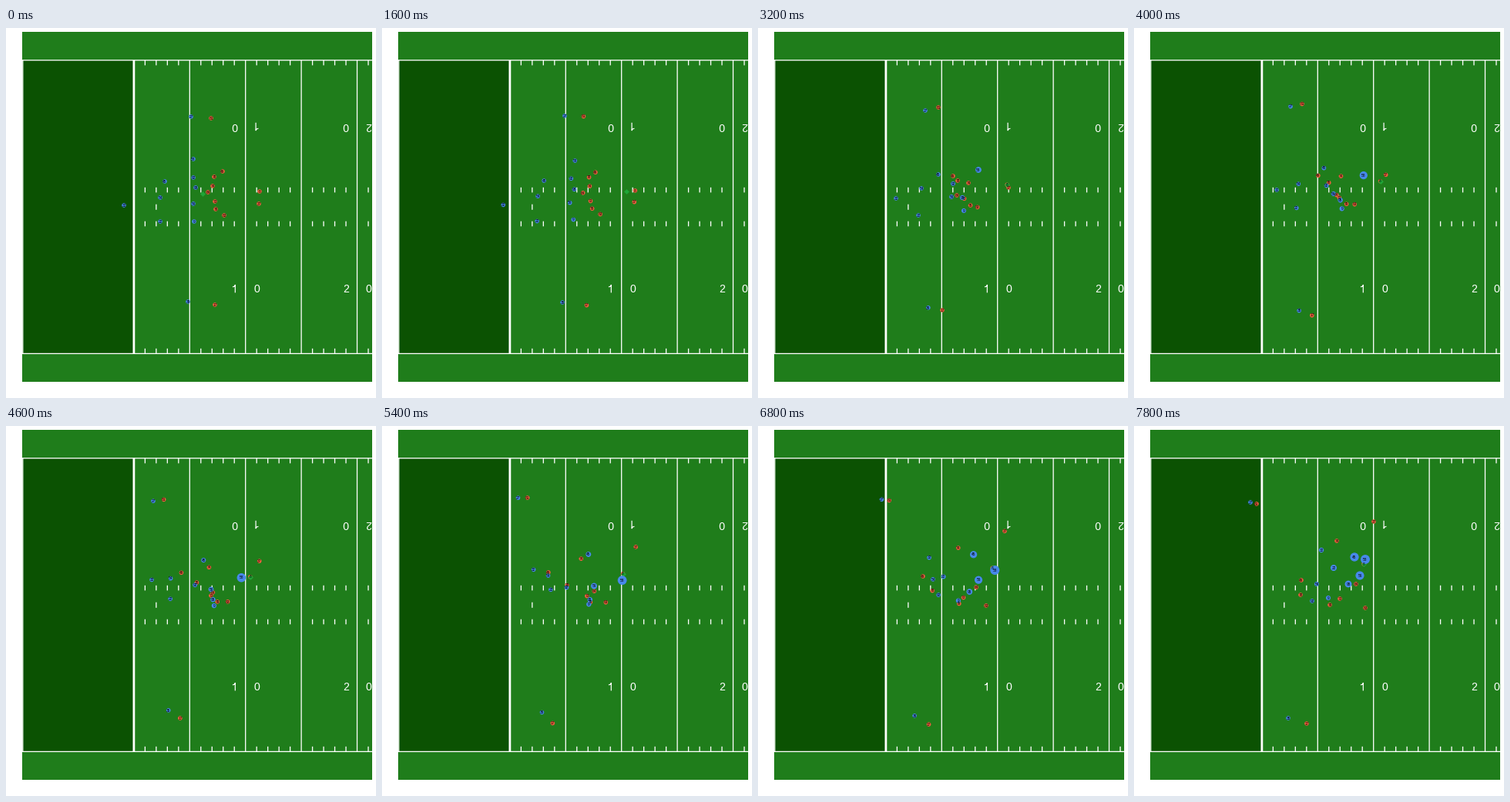
These frames come from a looping animation (480 px wide and 480 px high, 8000 ms). A matplotlib script:

```python
import numpy as np
import matplotlib.pyplot as plt
from matplotlib.animation import FuncAnimation
from matplotlib.patches import Rectangle

SIZE, DPI = 480, 100
FRAMES, STEP = 40, 200
PX = 72 / DPI

GRASS, ENDZONE = "#1f7d1b", "#0b5202"
BLUE, RED, BALL = "#4788ea", "#f0603f", "#1fa637"
GOAL, YARD = 165.9, 14.48
TOP, BOTTOM = 41.8, 422.4
LEFT, RIGHT = 21, 475

TIMES = np.arange(FRAMES) * STEP / 1000
MOVE_START, MOVE_END = 0.9, 7.8
DOT, GROWTH, REACH = 5.6, 6.5, 40


def run(*points):
    """Path from rest through evenly timed points, as a cubic Hermite curve."""
    p = np.array(points, float)
    last = len(p) - 1
    u = np.clip((TIMES - MOVE_START) / (MOVE_END - MOVE_START), 0, 1) * last
    i = np.minimum(u.astype(int), last - 1)
    s = (u - i)[:, None]
    m = np.gradient(p, axis=0)
    m[0] = 0
    return ((2 * s**3 - 3 * s**2 + 1) * p[i] + (s**3 - 2 * s**2 + s) * m[i]
            + (3 * s**2 - 2 * s**3) * p[i + 1] + (s**3 - s**2) * m[i + 1])


passer = run((329, 212), (318, 197), (298, 179))

offense = {
    "81": run((266, 117), (234, 103), (187, 93), (159, 101)),
    "49": run((281, 186), (253, 192), (215, 190), (217, 200)),
    "78": run((270, 193), (259, 198), (239, 207), (216, 219)),
    "74": run((268, 205), (273, 201), (258, 171), (263, 149)),
    "64": run((262, 213), (258, 217), (276, 214), (288, 205)),
    "73": run((271, 225), (266, 220), (267, 224)),
    "79": run((272, 235), (275, 228), (254, 232)),
    "83": run((283, 243), (287, 228), (300, 236)),
    "37": run((328, 228), (325, 207), (329, 155), (311, 124)),
    "17": run((271, 359), (239, 366), (221, 386), (224, 386)),
    "8": passer,
}

defense = {
    "27": run((240, 115), (217, 107), (175, 93), (151, 99)),
    "58": run((243, 170), (286, 184), (312, 200), (300, 173)),
    "92": run((243, 194), (253, 202), (239, 210), (231, 227)),
    "45": run((206, 199), (234, 190), (269, 166), (286, 170)),
    "95": run((246, 207), (265, 220), (270, 225), (278, 205)),
    "54": run((200, 220), (212, 208), (216, 194), (237, 205)),
    "56": run((243, 228), (251, 219), (276, 207), (293, 194)),
    "22": run((200, 251), (208, 243), (220, 211), (259, 184)),
    "9": run((244, 251), (267, 237), (268, 231), (252, 223)),
    "32": run((153, 230), (179, 221), (198, 185), (243, 161)),
    "35": run((236, 355), (212, 368), (200, 379)),
}

# The ball flies from the snap to the passer, then stays with him.
flight = np.clip((TIMES - 0.2) / 1.65, 0, 1)[:, None]
ball_path = (1 - flight) * (255, 215) + flight * passer


def pressure_size(path):
    """Defenders swell as they close in on the passer."""
    dist = np.hypot(*(path - passer).T)
    return DOT + GROWTH * np.exp(-(dist / REACH) ** 2)


class Team:
    def __init__(self, ax, players, color, z, size=None):
        self.paths = np.array(list(players.values()))
        sizes = [size(p) if size else np.full(FRAMES, DOT) for p in self.paths]
        self.areas = (np.array(sizes) * PX) ** 2
        self.dots = ax.scatter(*self.paths[:, 0].T, c=color, linewidths=0, zorder=z)
        self.texts = [ax.text(0, 0, s, size=4.8 * PX, ha="center",
                              va="baseline", zorder=9) for s in players]

    def update(self, k):
        pos = self.paths[:, k]
        self.dots.set_offsets(pos)
        self.dots.set_sizes(self.areas[:, k])
        for text, (x, y) in zip(self.texts, pos):
            text.set_position((x, y + 1.7))


def line(ax, xs, ys, width=1.3):
    ax.plot(xs, ys, color="white", lw=width * PX, solid_capstyle="butt",
            snap=False, zorder=2)


def digit(ax, x, y, char, flip=1):
    """A yard number on its baseline; flip=-1 turns it upside down."""
    if char == "1":
        stem = np.array([(-2.2, -7.5), (0.2, -8.3), (1.1, -10), (1.1, 0)])
        xs, ys = (stem * flip + (x, y)).T
        line(ax, xs, ys, 1.2)
        return
    ax.text(x, y, char, color="white", size=14 * PX, ha="center", va="baseline",
            rotation=0 if flip > 0 else 180, rotation_mode="anchor", zorder=3)


def draw_field(ax):
    ax.add_patch(Rectangle((LEFT, 5.2), RIGHT - LEFT, 454, fc=GRASS, lw=0, zorder=0))
    ax.add_patch(Rectangle((22, TOP), GOAL - 22, BOTTOM - TOP, fc=ENDZONE, lw=0, zorder=1))
    for y in (TOP, BOTTOM):
        line(ax, [LEFT, RIGHT], [y, y])
    line(ax, [21.8, 21.8], [TOP, BOTTOM])
    line(ax, [GOAL, GOAL], [TOP, BOTTOM], 2.8)
    for yard in range(1, 22):
        x = GOAL + yard * YARD
        if yard % 5 == 0:
            line(ax, [x, x], [TOP, BOTTOM])
        else:
            for y in (TOP, 206.8, 250.7, BOTTOM - 6.6):
                line(ax, [x, x], [y, y + 6.6])
    mid = GOAL + 2 * YARD
    line(ax, [mid, mid], [228.7, 235.8])
    for yard, tens in ((10, "1"), (20, "2")):
        x = GOAL + yard * YARD
        near, far = x - YARD, x + YARD
        digit(ax, near, 343.4, tens)
        digit(ax, far, 343.4, "0")
        digit(ax, near, 122.8, "0", -1)
        digit(ax, far, 122.8, tens, -1)


plt.rcParams["font.family"] = "Liberation Sans"
fig = plt.figure(figsize=(SIZE / DPI, SIZE / DPI), dpi=DPI, facecolor="white")
ax = fig.add_axes([0, 0, 1, 1])
ax.axis("off")

draw_field(ax)
teams = [Team(ax, offense, RED, 4), Team(ax, defense, BLUE, 6, pressure_size)]
ball, = ax.plot([], [], "D", color=BALL, ms=4.8 * PX, mew=0, zorder=5)
ax.set_xlim(0, SIZE)
ax.set_ylim(SIZE, 0)


def update(k):
    for team in teams:
        team.update(k)
    ball.set_data(ball_path[k:k + 1].T)
    return [ball]


anim = FuncAnimation(fig, update, frames=FRAMES, interval=STEP,
                     repeat=True, repeat_delay=0, blit=False)
plt.show()
```
